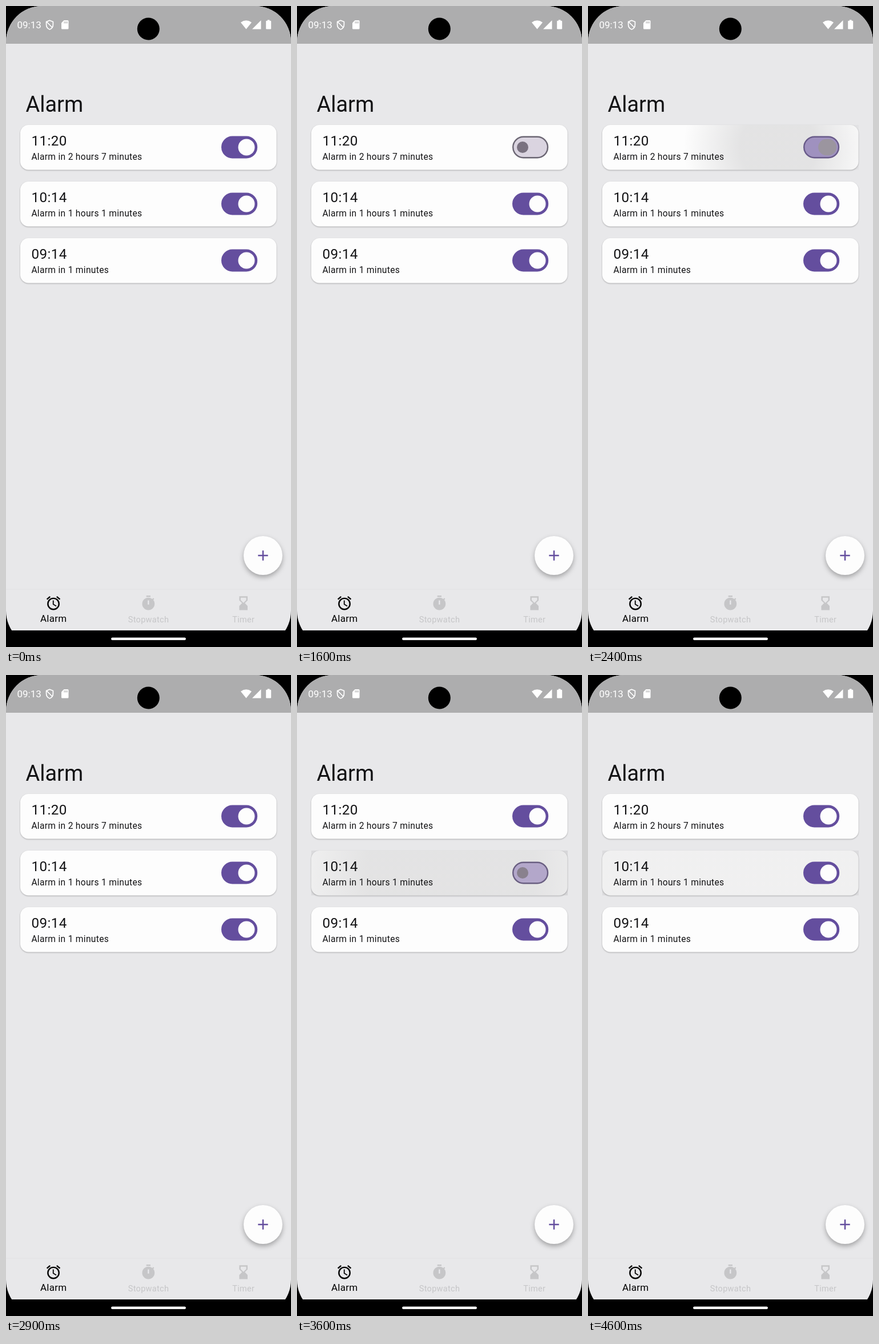
Animation of 499 by 1121 pixels, one loop 4700 ms. Source, as an HTML page:

```html
<!DOCTYPE html>
<html lang="en">
<head>
<meta charset="utf-8">
<title>Alarm list</title>
<style>
  html, body { margin: 0; width: 100%; height: 100%; overflow: hidden; background: #000; }
  svg { display: block; width: 100%; height: 100%; }
  text { font-family: Roboto, sans-serif; fill: #121214; letter-spacing: .3px; }
  .title { font-size: 37.9px; letter-spacing: 0; }
  .time { font-size: 24.2px; letter-spacing: .4px; }
  .left { font-size: 15.6px; }
  .clock { font-size: 17px; letter-spacing: 0; fill: #fff; }
  .tab { font-size: 14.5px; text-anchor: middle; fill: #c6c6c8; }
  .active { font-size: 17px; fill: #000; }
  .card { fill: #fdfdfd; filter: drop-shadow(0 1px 1px rgba(0, 0, 0, .27)); }
  .fab { fill: #fdfdfd; filter: drop-shadow(0 4px 4.5px rgba(0, 0, 0, .3)); }
</style>
</head>
<body>
<svg viewBox="0 0 499 1121" xmlns="http://www.w3.org/2000/svg">
  <defs>
    <clipPath id="screen"><rect width="499" height="1121" rx="63"/></clipPath>
  </defs>
  <rect width="499" height="1121"/>
  <g clip-path="url(#screen)">
    <rect width="499" height="1092" fill="#e8e8ea"/>
    <rect width="499" height="66" fill="#adadae"/>
    <rect y="1019" width="499" height="2" fill="#e5e5e7"/>
  </g>
  <circle cx="249.3" cy="40" r="19.5"/>

  <g fill="#fff">
    <text class="clock" x="19.5" y="39">09:13</text>
    <path d="M76.5 25.2L82.4 27.6V32.5C82.4 36.5 80 39.8 76.5 41C73 39.8 70.6 36.5 70.6 32.5V27.6ZM71 27.5L81.5 38" fill="none" stroke="#fff" stroke-width="1.7"/>
    <path d="M101.5 25H108Q109.5 25 109.5 26.5V39Q109.5 40.5 108 40.5H98.5Q97 40.5 97 39V29.5Z"/>
    <path d="M102.2 27v3.4M104.6 27v3.4M107 27v3.4" stroke="#adadae" stroke-width="1.1"/>
    <path d="M411 28.7Q420.5 21.8 430 28.7L420.5 40.5Z"/>
    <path d="M446.5 25V40.5H431Z"/>
    <rect x="457.8" y="24.3" width="3.7" height="3"/>
    <rect x="455.2" y="25.8" width="9" height="14.7" rx="1.2"/>
  </g>

  <text class="title" x="34.5" y="185">Alarm</text>
  <g id="list"></g>

  <circle class="fab" cx="450" cy="961" r="34"/>
  <path d="M441.3 961h17.4M450 952.3v17.4" stroke="#644e9e" stroke-width="2.5"/>

  <g transform="translate(68.5 1029.8) scale(1.211)" fill="none" stroke="#000" stroke-width="2">
    <circle cx="12" cy="13" r="8"/>
    <path d="M2.6 6.5L7.2 2.6M21.4 6.5L16.8 2.6"/>
    <path d="M11.75 8V13.6L16.1 16.2" stroke-width="1.5"/>
  </g>
  <g transform="translate(234.8 1029.8) scale(1.211)" fill="#c6c6c8">
    <circle cx="12" cy="13" r="9"/>
    <path d="M9 1h6v2H9ZM18.3 8.1L17 6.7L19 4.6L20.4 6Z"/>
    <path d="M11 8h2v6h-2Z" fill="#e8e8ea"/>
  </g>
  <path transform="translate(401.2 1029.8) scale(1.211)" fill="#c6c6c8" fill-rule="evenodd"
    d="M6 2H18V8L14 12L18 16V22H6V16L10 12L6 8ZM8 4V7.5L12 11.5L16 7.5V4Z"/>
  <text class="tab active" x="83.2" y="1077">Alarm</text>
  <text class="tab" x="249.5" y="1078">Stopwatch</text>
  <text class="tab" x="415.8" y="1078">Timer</text>

  <rect x="184" y="1104.5" width="131" height="4.6" rx="2.3" fill="#f6f6f6"/>
</svg>
<script>
const LOOP = 4700, STEP = 100;
const PURPLE = [100, 78, 158], TRACK_OFF = [218, 212, 224], OUTLINE_OFF = [107, 102, 115],
  THUMB_OFF = [122, 114, 128], WHITE = [253, 253, 253];

const alarms = [
  ["11:20", "Alarm in 2 hours 7 minutes"],
  ["10:14", "Alarm in 1 hours 1 minutes"],
  ["09:14", "Alarm in 1 minutes"]
];

// A tap on the card, rather than the switch, sends out a ripple with a spread time in ms.
const taps = [
  { card: 0, start: 1400, on: false },
  { card: 0, start: 2200, on: true, spread: 406 },
  { card: 1, start: 3500, on: false, spread: 163 },
  { card: 1, start: 4100, on: true, spread: 464 }
];

const clamp = v => Math.min(1, Math.max(0, v));
const smooth = v => (v = clamp(v)) * v * (3 - 2 * v);
const lerp = (a, b, k) => a + (b - a) * k;
const mix = (from, to, k) =>
  `rgb(${from.map((v, i) => Math.round(lerp(v, to[i], k))).join()})`;
const set = (node, attrs) => {
  for (const name in attrs) node.setAttribute(name, attrs[name]);
};

const list = document.getElementById("list");
list.innerHTML = alarms.map(([time, left], i) => `
  <g transform="translate(0 ${208 + i * 99})">
    <radialGradient id="glow${i}" gradientUnits="userSpaceOnUse" cy="39">
      <stop offset=".4" stop-color="#141218"/>
      <stop offset="1" stop-color="#141218" stop-opacity="0"/>
    </radialGradient>
    <rect class="card" x="25" width="448.6" height="78.4" rx="14.5"/>
    <rect class="ripple" x="25" width="449" height="78.4" fill="url(#glow${i})"/>
    <text class="time" x="44.4" y="36">${time}</text>
    <text class="left" x="44.4" y="61.3">${left}</text>
    <rect class="track" x="378.2" y="20.8" width="60.8" height="36.4" rx="18.2" stroke-width="2.4"/>
    <rect class="thumb"/>
  </g>`).join("");

const cards = [...list.children].map(group => ({
  ripple: group.querySelector(".ripple"),
  glow: group.querySelector("radialGradient"),
  track: group.querySelector(".track"),
  thumb: group.querySelector(".thumb")
}));

function drawSwitch({ track, thumb }, on, age) {
  const slide = on ? smooth((age + 50) / 300) : 1 - smooth((age + 100) / 200);
  const tint = on ? smooth(age / 400) : 1 - clamp((age + 100) / 300);
  const height = lerp(20, 29, slide);
  const width = height + 16 * Math.sin(Math.PI * slide);
  set(track, {
    fill: mix(TRACK_OFF, PURPLE, tint),
    stroke: mix(OUTLINE_OFF, PURPLE, tint)
  });
  set(thumb, {
    x: lerp(395, 421, slide) - width / 2, y: 39 - height / 2,
    width, height, rx: height / 2,
    fill: mix(THUMB_OFF, WHITE, tint * tint)
  });
}

// The ripple grows from the finger, drifts to the card's centre and fades.
function drawRipple({ ripple, glow }, spread, age) {
  const grown = spread ? ((age + 50) / spread) ** 2 : 0;
  set(glow, { cx: lerp(385, 249, clamp(grown)), r: 440 * grown });
  set(ripple, { opacity: spread ? .11 * clamp((650 - age) / 300) : 0 });
}

function drawCard(card, i, t) {
  const tap = taps.findLast(tap => tap.card === i && tap.start <= t)
    || { start: -LOOP, on: true };
  drawSwitch(card, tap.on, t - tap.start);
  drawRipple(card, tap.spread, t - tap.start);
}

function frame() {
  const t = Math.floor(performance.now() % LOOP / STEP) * STEP;
  cards.forEach((card, i) => drawCard(card, i, t));
  requestAnimationFrame(frame);
}
frame();
</script>
</body>
</html>
```
